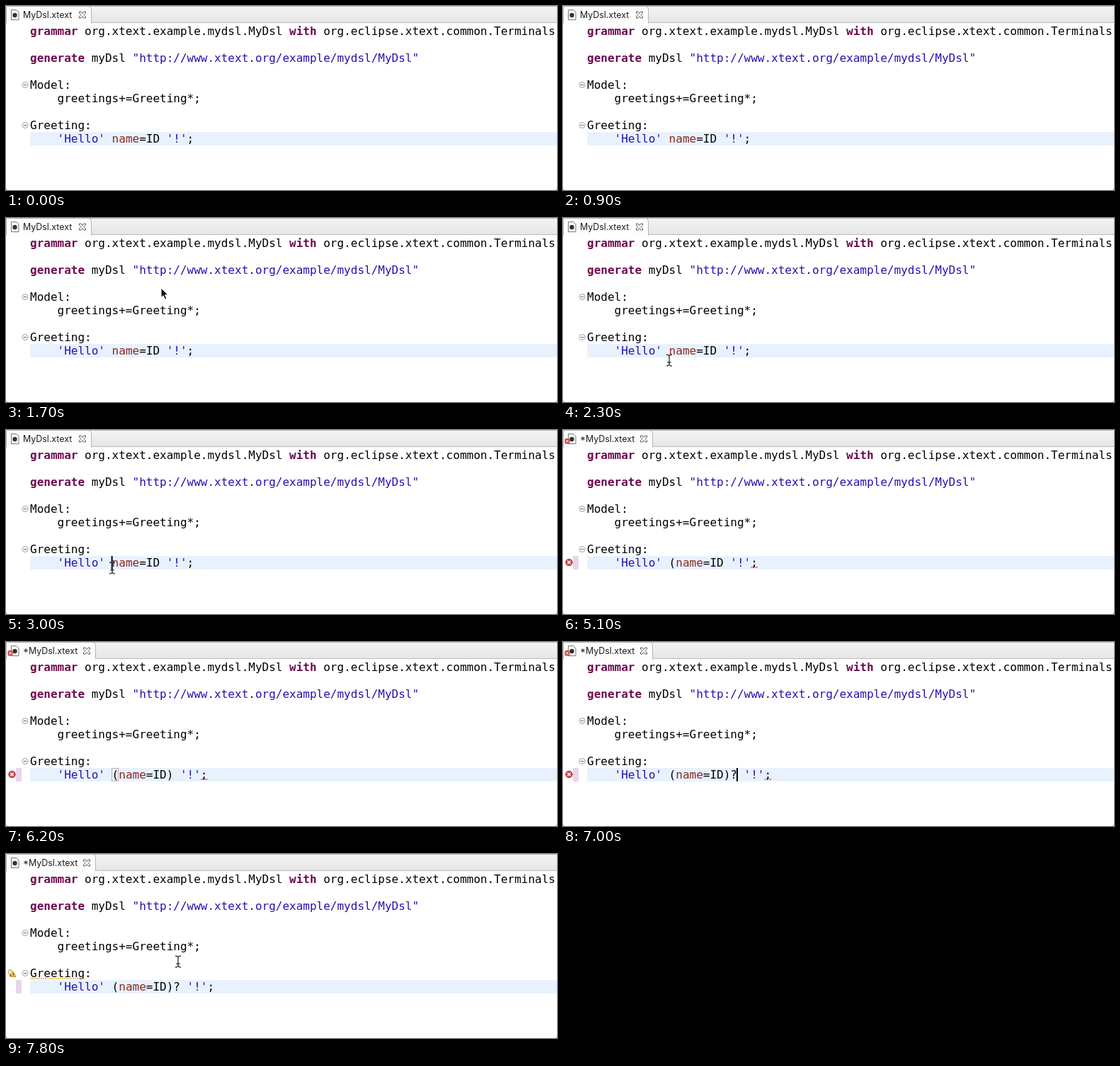
These frames come from a looping animation (778 px wide and 260 px high, 8000 ms). An HTML page:

```html
<!DOCTYPE html>
<html lang="en">
<head>
<meta charset="utf-8">
<title>Grammar editor</title>
<style>
  html, body { margin: 0; width: 100%; height: 100%; overflow: hidden; background: #fff; }
  svg { display: block; width: 778px; height: 260px; }
  text { white-space: pre; fill: #000; }
  .code { font: 16px "DejaVu Sans Mono", monospace; }
  .tab { font: 12.4px Inter, sans-serif; fill: #1c1c1c; }
  .keyword { font-weight: bold; fill: #6d0a4f; }
  .string { fill: #2a0fae; }
  .feature { fill: #8a271d; }
  .line { fill: none; stroke-width: 1; }
</style>
</head>
<body>
<svg viewBox="0 0 778 260">
  <defs>
    <linearGradient id="bar" x2="0" y2="1">
      <stop stop-color="#f3f3f3"/><stop offset="1" stop-color="#e6e6e6"/>
    </linearGradient>
  </defs>
  <rect width="778" height="260" fill="#8c8c8c"/>
  <path d="M0 0H778V257Q778 260 775 260H3Q0 260 0 257Z" fill="#fff"/>

  <rect width="778" height="24" fill="url(#bar)"/>
  <path class="line" d="M0 .5H778M0 23.5H778" stroke="#bcbcbc"/>
  <path id="tabShape" stroke="#b4b4b4" fill="#fdfdfd"/>
  <path d="M7.5 5.5H14.5L18 9V19.5H7.5Z" fill="#fff" stroke="#777"/>
  <circle cx="12.5" cy="13" r="3.2" fill="#333"/>
  <g id="tabError">
    <rect x="2.5" y="12" width="7" height="7.5" rx="1.5" fill="#c94743"/>
    <path class="line" d="M4 13.7L8 17.7M8 13.7L4 17.7" stroke="#fff"/>
  </g>
  <text id="tabName" class="tab" x="24" y="17"></text>
  <path id="tabClose" class="line" stroke="#5c5c5c"
    d="M-4.5-4.5H-2L0-2L2-4.5H4.5V-2.5L2 0L4.5 2.5V4.5H2L0 2L-2 4.5H-4.5V2.5L-2 0L-4.5-2.5Z"/>

  <rect x="34" y="178" width="744" height="19" fill="#e8f2fe"/>
  <rect id="diffMark" x="14" y="178" width="8" height="19" fill="#e7d6e9"/>
  <g id="folds" class="line" stroke="#a59a9f"></g>
  <g id="code" class="code"></g>

  <path id="errorWave" class="line" stroke="#d0206a" d="M0 195l2-2l2 2l2-2l2 2l2-2"/>
  <g id="errorMark">
    <circle cx="8.5" cy="187" r="5.3" fill="#bf4a48"/>
    <path class="line" d="M6.3 184.8L10.7 189.2M10.7 184.8L6.3 189.2" stroke="#fff" style="stroke-width:1.4"/>
  </g>
  <g id="warning">
    <path class="line" d="M34 176H111" stroke="#e2ae35" stroke-dasharray="2 1" style="stroke-width:1.4"/>
    <circle cx="6" cy="166.5" r="3" fill="#fbe9a0" stroke="#c49a3c"/>
    <path d="M4.8 170h2.6v3h-2.6z" fill="#8f8256"/>
    <path d="M10.5 166.5L14 173.5H7Z" fill="#f6cf52" stroke="#bd8b25"/>
    <path class="line" d="M10.5 169v3" stroke="#5f4510"/>
  </g>
  <rect id="bracketBox" class="line" x="149.5" y="178.5" width="9" height="18" stroke="#b5b5b5"/>
  <rect id="caret" y="178" width="2" height="19"/>

  <path id="arrow" d="M0 0V13.5L3.1 10.7L5.3 15.8L7.8 14.7L5.6 9.7H9.8Z" fill="#111" stroke="#fff" stroke-width="1"/>
  <g id="beam" class="line">
    <path id="beamShape" d="M-4-8Q0-8 0-5Q0-8 4-8M0-5V5M-4 8Q0 8 0 5Q0 8 4 8M-2.5 3H2.5" stroke="#333" style="stroke-width:1.3"/>
  </g>
</svg>
<script>
const LOOP = 8000, STEP = 100, LEFT = 34, CHAR = 9.633, ROW = 19, BASE = 41;
const NS = "http://www.w3.org/2000/svg";
const $ = id => document.getElementById(id);
const column = n => LEFT + n * CHAR;
const show = (id, on) => { $(id).style.display = on ? "" : "none"; };
const move = (id, x, y = 0) => $(id).setAttribute("transform", `translate(${x} ${y})`);

function add(parent, tag, attrs, text = "") {
  const node = document.createElementNS(NS, tag);
  for (const key in attrs) node.setAttribute(key, attrs[key]);
  node.textContent = text;
  return parent.appendChild(node);
}

// Each line is a list of "text" or ["text", "style"].
function addLine(row, ...parts) {
  const line = add($("code"), "text", { x: LEFT, y: BASE + row * ROW });
  return parts.map(part => {
    const [text, style = ""] = [].concat(part);
    return add(line, "tspan", { class: style }, text);
  });
}

addLine(0, ["grammar", "keyword"], " org.xtext.example.mydsl.MyDsl ", ["with", "keyword"],
  " org.eclipse.xtext.common.Terminals");
addLine(2, ["generate", "keyword"], " myDsl ", ['"http://www.xtext.org/example/mydsl/MyDsl"', "string"]);
addLine(4, "Model:");
addLine(5, "    greetings+=Greeting*;");
addLine(7, "Greeting:");
const [, , open, , close] = addLine(8, ["    'Hello'", "string"], " ", "", ["name", "feature"],
  "=ID", " ", ["'!'", "string"], ";");

for (const y of [111.5, 168.5]) {
  add($("folds"), "circle", { cx: 27, cy: y, r: 4 });
  add($("folds"), "path", { d: `M24.8 ${y}h4.4`, stroke: "#666" });
}

const TYPED = { open: 3500, close: 5600, optional: 6900 };
const ERROR = [4000, 7300], WARNING = 7600;

// Caret: [time, column]; blinking restarts at every step.
const caretSteps = [[2600, 12], [3500, 13], [4000, 14], [4200, 15], [4300, 17],
  [4400, 19], [4500, 20], [5600, 21], [6900, 22]];

// Pointer: [time, x, y, shape]
const pointerSteps = [[0, 0, 0, ""], [1600, 262, 34, "arrow"], [1700, 219, 99, "arrow"],
  [1800, 190, 160, "arrow"], [1900, 166, 215, "beam"], [2000, 156, 243, "beam"],
  [2100, 152, 232, "beam"], [2200, 150, 212, "beam"], [2300, 150, 201, "beam"],
  [2400, 150, 195, "beam"], [3500, 0, 0, ""], [7500, 180, 180, "beam"],
  [7600, 216, 163, "beam"], [7700, 237, 155, "beam"], [7800, 243, 152, "beam"]];

const current = (steps, t) => steps.filter(step => step[0] <= t).pop();

function render(t) {
  const dirty = t >= TYPED.open, closed = t >= TYPED.close, optional = t >= TYPED.optional;
  open.textContent = dirty ? "(" : "";
  close.textContent = "=ID" + (closed ? ")" : "") + (optional ? "?" : "");

  const edge = dirty ? 126.5 : 120.5;
  $("tabName").textContent = (dirty ? "*" : "") + "MyDsl.xtext";
  $("tabShape").setAttribute("d", `M.5 24.5V.5H${edge - 5}Q${edge} .5 ${edge} 6V24.5`);
  move("tabClose", edge - 12.5, 12.5);
  show("diffMark", dirty);

  const error = t >= ERROR[0] && t < ERROR[1];
  for (const id of ["tabError", "errorMark", "errorWave"]) show(id, error);
  move("errorWave", column(24 + closed + optional));
  show("warning", t >= WARNING);
  show("bracketBox", closed && !optional);

  const caret = current(caretSteps, t);
  show("caret", caret && (t - caret[0]) % 1000 < 500);
  if (caret) $("caret").setAttribute("x", column(caret[1]) - 1);

  const [, x, y, shape] = current(pointerSteps, t);
  for (const id of ["arrow", "beam"]) {
    show(id, id === shape);
    move(id, x, y);
  }
}

const start = performance.now();
function tick() {
  const t = (performance.now() - start) % LOOP;
  render(Math.floor(t / STEP) * STEP);
  requestAnimationFrame(tick);
}
tick();
</script>
</body>
</html>
```
